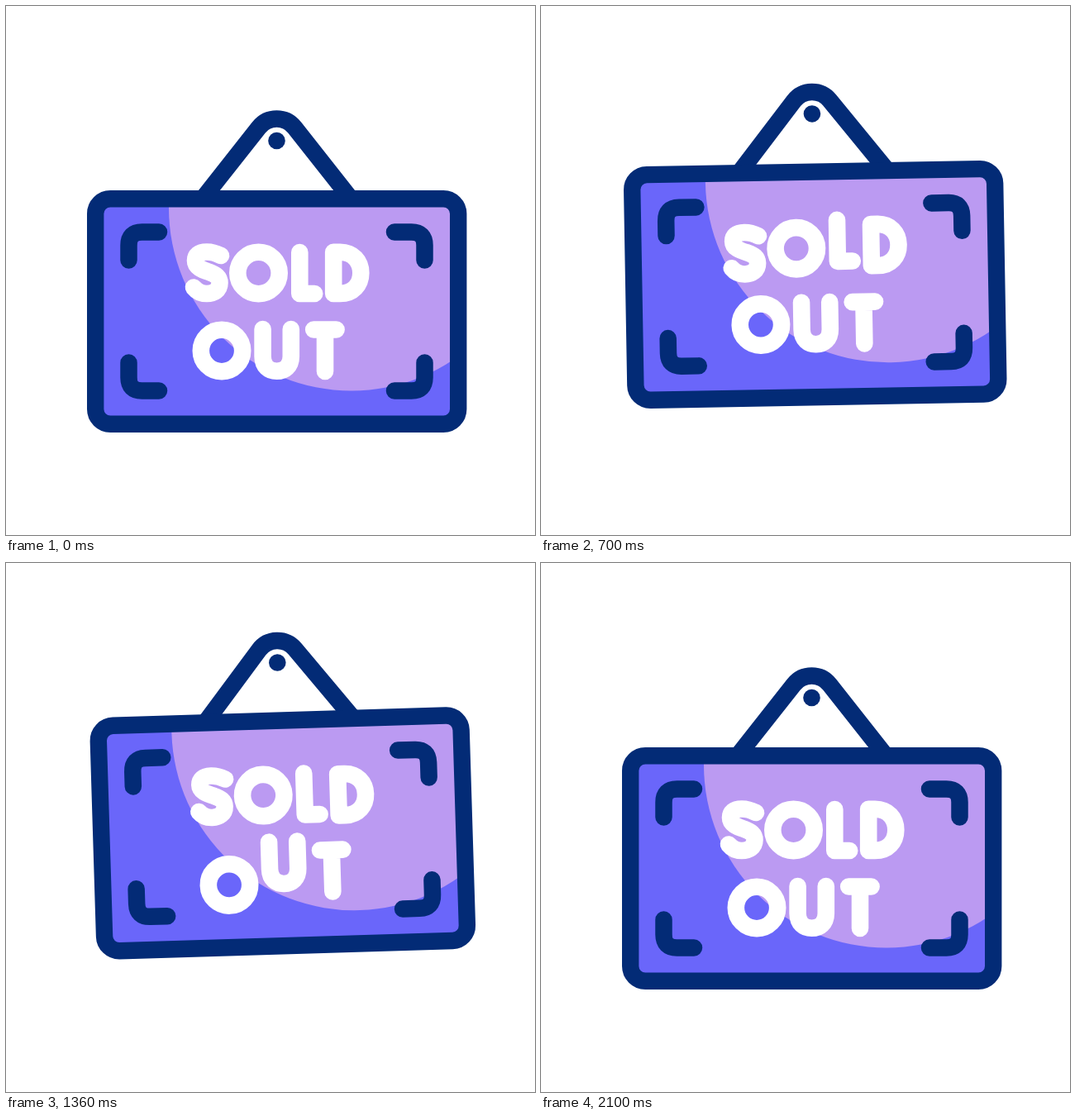
Recreate the animation shown at these times as an HTML page with a canvas. Size 640 by 640 pixels, loop 2400 ms.

```html
<!DOCTYPE html>
<html lang="en">
<head>
<meta charset="utf-8">
<title>Sold out sign</title>
<style>
html, body { margin: 0; width: 100%; height: 100%; overflow: hidden; background: #fff; }
canvas { display: block; width: 640px; height: 640px; }
</style>
</head>
<body>
<canvas id="stage" role="img" aria-label="Sold out"></canvas>
<script>
const NAVY = '#032b76', BLUE = '#6a66fa', LILAC = '#bb9af2', WHITE = '#fff';
const LOOP = 2400, STEP = 20;
const PIVOT = { x: 327.5, y: 136.5 };
const MID = { x: 327.5, y: 369.5 };

const canvas = document.getElementById('stage');
const ctx = canvas.getContext('2d');
const ratio = window.devicePixelRatio || 1;
canvas.width = canvas.height = 640 * ratio;

const ring = (x, y) => {
  const p = new Path2D();
  p.arc(x, y, 25.2, 0, Math.PI * 2);
  return p;
};

// Letters in the order in which they hop
const letters = [
  new Path2D('M260 302 Q251 297.5 243 297.5 C233 297.5 229 302 229 308 C229 316 237 319 246 322 C254 325 258.5 328 258.5 335 C258.5 344 251 348 243 348 C236 348 231 345.5 227 340.5'),
  ring(305.5, 323),
  new Path2D('M355.3 298 V348 H373.2'),
  new Path2D('M396.2 297.8 H404 C420 297.8 429.3 309 429.3 323 C429.3 337 420 348 404 348 H396.2 Z'),
  ring(261, 417),
  new Path2D('M310.6 391 V424 C310.6 436 318 441.8 327.5 441.8 C337 441.8 344.8 436 344.8 424 V391'),
  new Path2D('M372.2 391.5 H399.6 M386 391.5 V442')
];
const bracket = new Path2D('M185 273.5 H164.5 Q148.5 273.5 148.5 289.5 V307.5');

const hanger = new Path2D();
hanger.moveTo(238, 233);
hanger.arcTo(327.5, 119.5, 417, 233, 27.7);
hanger.lineTo(417, 233);

const board = new Path2D();
board.roundRect(108.2, 233.2, 439, 272.6, 18);

const clamp = v => Math.max(0, Math.min(1, v));
const ease = p => p * p * (3 - 2 * p);
const span = (t, a, b) => clamp((t - a) / (b - a));

const lift = t => -47 * (ease(span(t, 100, 1050)) - ease(span(t, 1190, 2080)));

// Damped swing, one key every 400 ms
const swings = [0, -6, 4, -2, 2, 0];
function tilt(t) {
  const k = clamp((t - 100) / 2000) * 5;
  const i = Math.min(4, Math.floor(k));
  return swings[i] + (swings[i + 1] - swings[i]) * ease(k - i);
}

// Up, down past the line, back: 200 ms each
function hop(t, i) {
  const p = (t - 200 - i * 200) / 200;
  if (p <= 0 || p >= 3) return 0;
  if (p < 1) return -15 * p ** 1.3;
  if (p < 2) return -15 + 35 * (p - 1);
  return 20 * (3 - p) ** 1.4;
}

function line(path, color, width) {
  ctx.strokeStyle = color;
  ctx.lineWidth = width;
  ctx.stroke(path);
}

function disc(x, y, r, color) {
  ctx.fillStyle = color;
  ctx.beginPath();
  ctx.arc(x, y, r, 0, Math.PI * 2);
  ctx.fill();
}

function draw(t) {
  ctx.setTransform(ratio, 0, 0, ratio, 0, 0);
  ctx.fillStyle = WHITE;
  ctx.fillRect(0, 0, 640, 640);
  ctx.lineCap = ctx.lineJoin = 'round';

  ctx.translate(PIVOT.x, PIVOT.y + lift(t));
  ctx.rotate(tilt(t) * Math.PI / 180);
  ctx.translate(-PIVOT.x, -PIVOT.y);

  line(hanger, NAVY, 20.5);
  disc(327.5, 163, 10.3, NAVY);

  ctx.fillStyle = BLUE;
  ctx.fill(board);
  ctx.save();
  ctx.clip(board);
  disc(418, 244.5, 221, LILAC);
  ctx.restore();
  line(board, NAVY, 20.4);

  for (const sx of [1, -1]) for (const sy of [1, -1]) {
    ctx.save();
    ctx.translate(MID.x, MID.y);
    ctx.scale(sx, sy);
    ctx.translate(-MID.x, -MID.y);
    line(bracket, NAVY, 20.5);
    ctx.restore();
  }

  letters.forEach((path, i) => {
    ctx.save();
    ctx.translate(0, hop(t, i));
    line(path, WHITE, 20.6);
    ctx.restore();
  });
}

const start = performance.now();
function tick(now) {
  const t = Math.max(0, now - start) % LOOP;
  draw(Math.floor(t / STEP) * STEP);
  requestAnimationFrame(tick);
}
draw(0);
requestAnimationFrame(tick);
</script>
</body>
</html>
```
